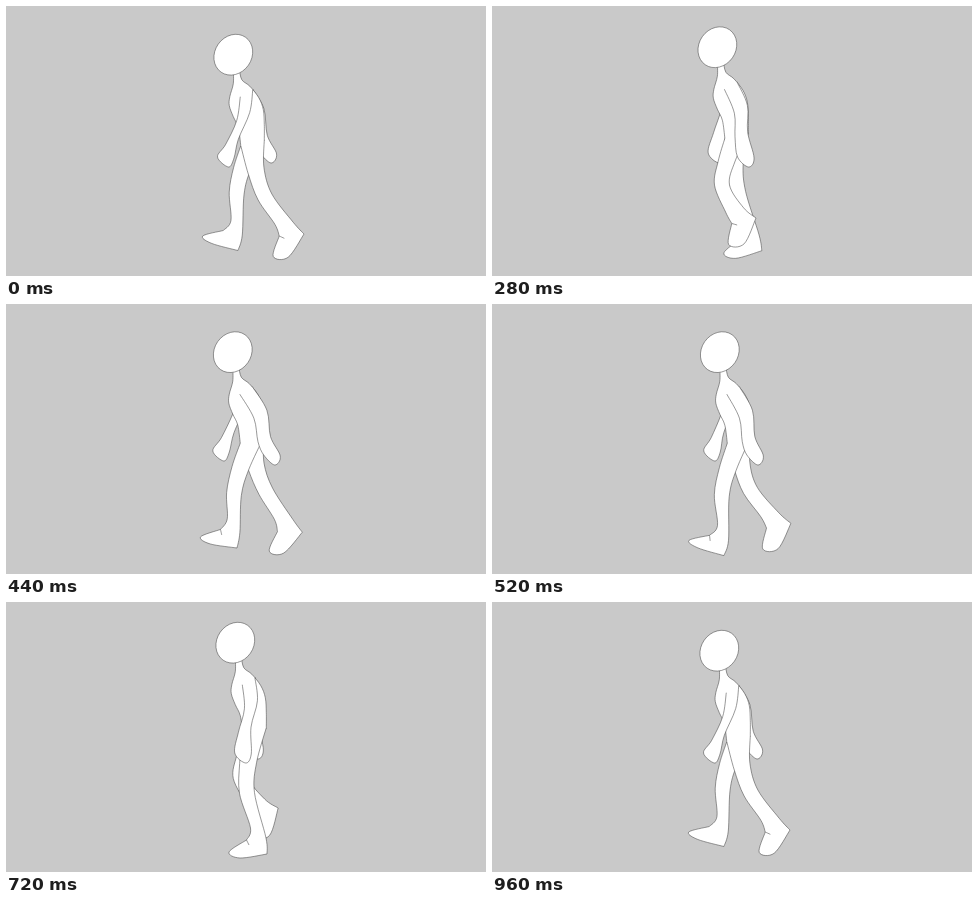
Animation of 480x270 px, one loop 1 s. Source, as an HTML page with a canvas:

```html
<!DOCTYPE html>
<html lang="en">
<head>
<meta charset="utf-8">
<title>Walk cycle</title>
<style>
  html, body { margin: 0; height: 100%; overflow: hidden; background: #c9c9c9; }
  canvas { display: block; }
</style>
</head>
<body>
<canvas id="stage" width="480" height="270"></canvas>
<script>
const ctx = document.getElementById('stage').getContext('2d');
const CYCLE = 24, STEP = 40, LOOP = 1000;

// Key poses of one stride; the other leg runs half a cycle later.
const stride = [
  { at: 0,  knee: [259, 191], heel: [298, 228], pitch: 39 },
  { at: 3,  knee: [245, 188], heel: [285, 215], pitch: 54 },
  { at: 7,  knee: [230, 179], heel: [264, 212], pitch: 47 },
  { at: 11, knee: [228, 190], heel: [231, 244], pitch: -14 },
  { at: 15, knee: [233, 192], heel: [240, 255], pitch: -17 },
  { at: 18, knee: [241, 191], heel: [261, 252], pitch: 0 }
];

// Periodic cubic interpolation of one channel of the stride.
function channel(t, read) {
  const n = stride.length;
  const time = i => stride[(i + n) % n].at + CYCLE * Math.floor(i / n);
  const value = i => read(stride[(i + n) % n]);
  let i = n - 1;
  while (stride[i].at > t) i--;
  const span = time(i + 1) - time(i), u = (t - time(i)) / span;
  const slope = j => (value(j + 1) - value(j - 1)) / (time(j + 1) - time(j - 1)) * span;
  const a = value(i), b = value(i + 1), p = slope(i), q = slope(i + 1);
  return a + u * (p + u * (3 * (b - a) - 2 * p - q + u * (2 * (a - b) + p + q)));
}

// Each run is a smooth curve; corners fall where runs meet.
function outline(...runs) {
  const path = new Path2D();
  path.moveTo(...runs[0][0]);
  for (const p of runs) {
    for (let i = 0; i < p.length - 1; i++) {
      const a = p[i], b = p[i + 1], before = p[i - 1] || a, after = p[i + 2] || b;
      path.bezierCurveTo(
        a[0] + (b[0] - before[0]) / 6, a[1] + (b[1] - before[1]) / 6,
        b[0] - (after[0] - a[0]) / 6, b[1] - (after[1] - a[1]) / 6, ...b);
    }
  }
  return path;
}

function paint(path, inner) {
  const area = new Path2D(path);
  if (inner) area.lineTo(...inner);
  ctx.fill(area);
  ctx.stroke(path);
}

function leg(t, body, dx, dy) {
  const joint = name => [
    channel(t, pose => pose[name][0]) + dx,
    channel(t, pose => pose[name][1]) + dy
  ];
  const knee = joint('knee'), heel = joint('heel');
  const pitch = channel(t, pose => pose.pitch) * Math.PI / 180;
  const c = Math.cos(pitch), s = Math.sin(pitch);
  // Foot space: u runs from heel to toe, v down through the sole.
  const foot = (u, v) => [heel[0] - u * c + v * s, heel[1] + u * s + v * c];

  const hip = body(14, 90), ankle = foot(11, -22), instep = foot(20.5, -14);
  const thigh = [(hip[0] + knee[0]) / 2, (hip[1] + knee[1]) / 2];
  const ax = ankle[0] - hip[0], ay = ankle[1] - hip[1], len = Math.hypot(ax, ay);
  const side = (p, w) => [p[0] - w * ay / len, p[1] + w * ax / len];

  paint(outline(
    [body(7.5, 91), side(thigh, 8.5), side(knee, 7.5), foot(16.5, -26), instep],
    [instep, foot(38, -2), foot(27, 4 + 6 * pitch), heel],
    [heel, foot(1, -16), side(knee, -7.5), side(thigh, -8.5), body(31, 85)]
  ));
  return outline([instep, foot(18, -9)]);
}

// A pendulum whose sway grows towards the fingertips.
function arm(t, body, dx, dy) {
  const sway = -Math.cos(2 * Math.PI * t / CYCLE + 0.32);
  const joint = (mid, reach, drop) => {
    const [x, y] = body(mid + reach * sway + dx, drop + dy);
    return (ox, oy) => [x + ox, y + oy];
  };
  const elbow = joint(18.5, 9.1, 62), wrist = joint(14.7, 16.8, 87);
  const tip = joint(18, 24, 161 - body(0, 0)[1]);
  paint(outline([
    body(7, 42), elbow(-6.5, 4), wrist(-6.3, 2.5), tip(-11, -10), tip(0, 0),
    tip(5.5, -9), wrist(6.3, -2.5), elbow(6.5, -4), body(19.5, 34.5)
  ]));
}

function torso(body) {
  const run = points => points.map(p => body(...p));
  paint(outline(
    run([[31, 85], [31, 70], [30, 55], [25.5, 43], [16.5, 31.5], [8.5, 25], [6, 14]]),
    run([[6, 14], [0, 16]]),
    run([[0, 16], [0, 29], [-3.5, 42], [-4, 51], [0, 62], [5, 73], [7.5, 91]])
  ), body(20, 100));
}

function draw(t) {
  const turn = 2 * Math.PI * t / CYCLE, opposite = (t + CYCLE / 2) % CYCLE;
  const x = 227.3 - 2 * Math.sin(turn), y = 44.7 + 4 * Math.cos(2 * turn);
  const body = (dx, dy) => [x + dx, y + dy];

  ctx.fillStyle = '#c9c9c9';
  ctx.fillRect(0, 0, 480, 270);
  ctx.fillStyle = '#fff';
  ctx.strokeStyle = '#444';
  ctx.lineWidth = 0.55;
  ctx.lineJoin = 'round';

  arm(opposite, body, -3, -4);
  leg(opposite, body, 2, -4);
  torso(body);
  ctx.stroke(leg(t, body, 0, 0));
  arm(t, body, 0, 0);

  const head = new Path2D();
  head.ellipse(x, y, 21.3, 18.4, -0.96, 0, 2 * Math.PI);
  paint(head);
}

function tick() {
  draw(Math.floor(performance.now() % LOOP / STEP) % CYCLE);
  requestAnimationFrame(tick);
}
tick();
</script>
</body>
</html>
```
